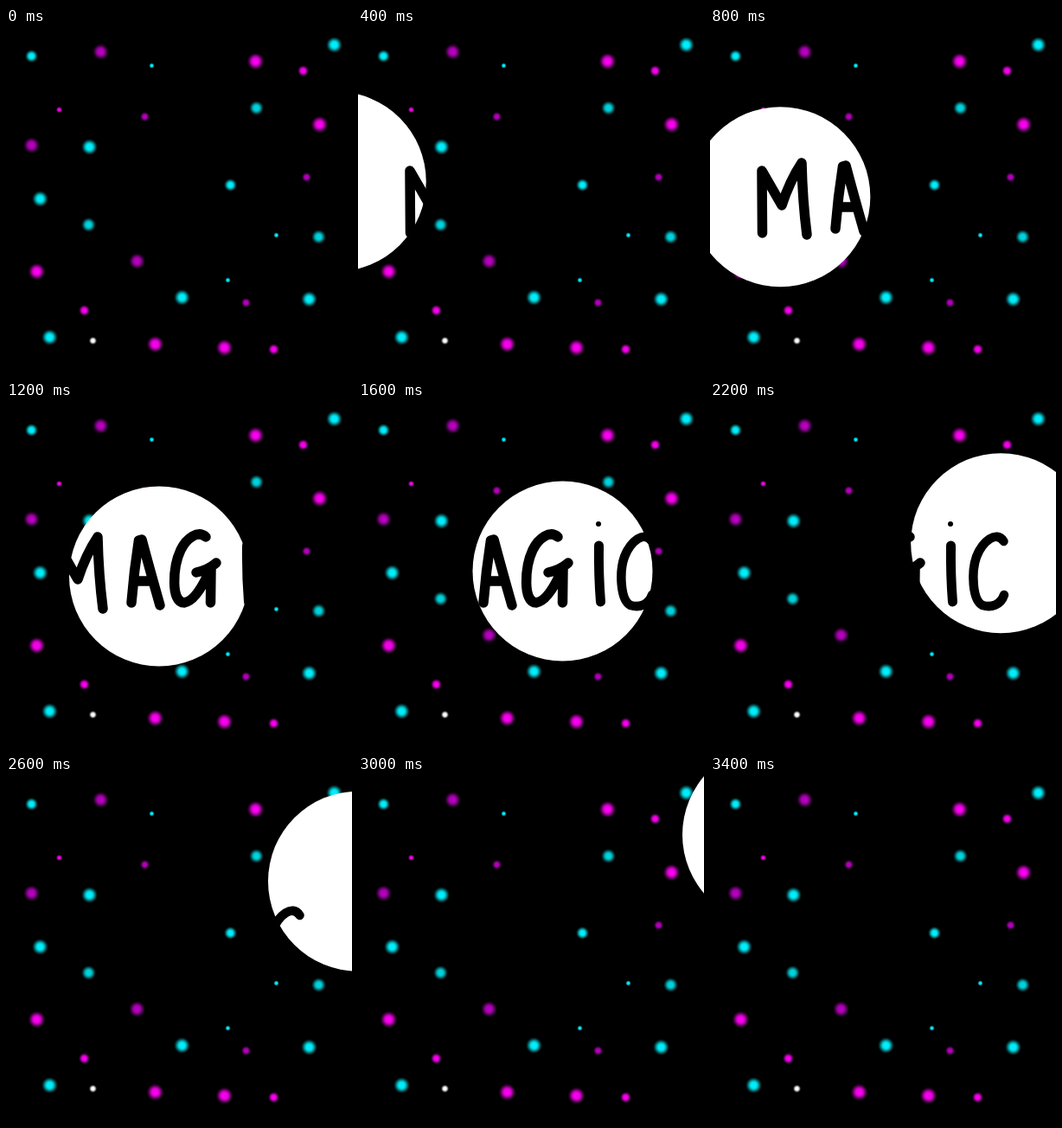
An HTML page with a canvas that plays this animation: 400x400 px, repeating every 3.6 s.

```html
<!DOCTYPE html>
<html lang="en">
<head>
<meta charset="utf-8">
<title>Magic moon</title>
<style>
  html, body { margin: 0; width: 100%; height: 100%; overflow: hidden; background: #000; }
  canvas { display: block; }
</style>
</head>
<body>
<canvas id="stage" width="400" height="400"></canvas>
<script>
const ctx = document.getElementById('stage').getContext('2d');
const STEP = 200, LOOP = 3600, RADIUS = 104;
const CYAN = '0,238,250', TEAL = '0,210,220', PINK = '245,0,235', PURPLE = '178,0,186', WHITE = '255,255,255';

// Glowing dots by colour and outer radius
const dots = [
  [CYAN, 10, [[379, 19], [39, 197], [350, 313], [50, 357], [96, 137], [203, 311]]],
  [CYAN, 8, [[29, 32], [259, 181]]],
  [CYAN, 3.5, [[168, 43], [312, 239], [256, 291]]],
  [TEAL, 9, [[289, 92], [95, 227], [361, 241]]],
  [PINK, 10.5, [[288, 38], [362, 111], [35, 281], [172, 365], [252, 369]]],
  [PINK, 7, [[343, 49], [90, 326], [309, 371]]],
  [PINK, 4, [[61, 94]]],
  [PURPLE, 10, [[109, 27], [29, 135], [151, 269]]],
  [PURPLE, 6, [[160, 102], [347, 172], [277, 317]]],
  [WHITE, 5, [[100, 361]]]
];

// Key poses of the moon: step, x, y; it moves evenly between them
const keys = [[1, -84, 163], [3, 33.5, 192], [6, 177, 201.5], [7, 214, 199], [8, 236.5, 195.5],
  [9, 266.5, 192.5], [12, 371, 148.5], [15, 479, 68], [16, 492, 68]];

// Hand-drawn letters: stroke width and path
const letters = [
  [11.5, 'M60.5 237 L60 165 L83 205 Q92 177 106 156 Q107 200 112 239'],
  [11.5, 'M145 232 Q148 195 153.5 160 L157 159 Q166 193 178 235 M149 207 H169'],
  [11.5, 'M231 156 C222 148 209 157 202 171 C193 190 190 232 206 232 Q220 230 236 194 ' +
         'M220 197 Q234 194 243 186 M237 193 L236.5 232'],
  [11, 'M278.5 166 Q278 200 280.5 231'],
  [6, 'M278 141 h.01'],
  [10.5, 'M339.5 161 C331 148 315 161 308 179 C302 196 303 229 315 235 C325 238 336 235 340 223']
].map(([width, d]) => [width, new Path2D(d)]);

function moonAt(step) {
  const next = keys.findIndex(([at]) => at >= step);
  if (next < 0 || step < keys[0][0]) return null;
  const to = keys[next], from = keys[next - 1] || [0, 0, 0];
  const k = (step - from[0]) / (to[0] - from[0]);
  return [1, 2].map(i => from[i] + (to[i] - from[i]) * k);
}

function drawDot(rgb, r, x, y) {
  const glow = ctx.createRadialGradient(x, y, 0, x, y, r);
  const softness = t => 1 - t * t * (3 - 2 * t);
  for (let t = 0; t <= 1; t += 0.125) {
    glow.addColorStop(0.25 + 0.75 * t, `rgba(${rgb},${softness(t)})`);
  }
  ctx.fillStyle = glow;
  ctx.fillRect(x - r, y - r, 2 * r, 2 * r);
}

function circle(x, y, r) {
  ctx.beginPath();
  ctx.arc(x, y, r, 0, 2 * Math.PI);
}

function drawMoon(x, y) {
  ctx.save();
  circle(x, y, RADIUS);
  ctx.fillStyle = '#fff';
  ctx.fill();
  // A slightly wider clip leaves no bright rim around the letters
  circle(x, y, RADIUS + 1);
  ctx.clip();
  ctx.lineCap = ctx.lineJoin = 'round';
  ctx.strokeStyle = '#000';
  for (const [width, path] of letters) {
    ctx.lineWidth = width;
    ctx.stroke(path);
  }
  ctx.restore();
}

function render() {
  const moon = moonAt(Math.floor(performance.now() % LOOP / STEP));
  ctx.fillStyle = '#000';
  ctx.fillRect(0, 0, 400, 400);
  for (const [rgb, r, spots] of dots) {
    for (const [x, y] of spots) drawDot(rgb, r, x + 0.5, y + 0.5);
  }
  if (moon) drawMoon(...moon);
  requestAnimationFrame(render);
}
render();
</script>
</body>
</html>
```
